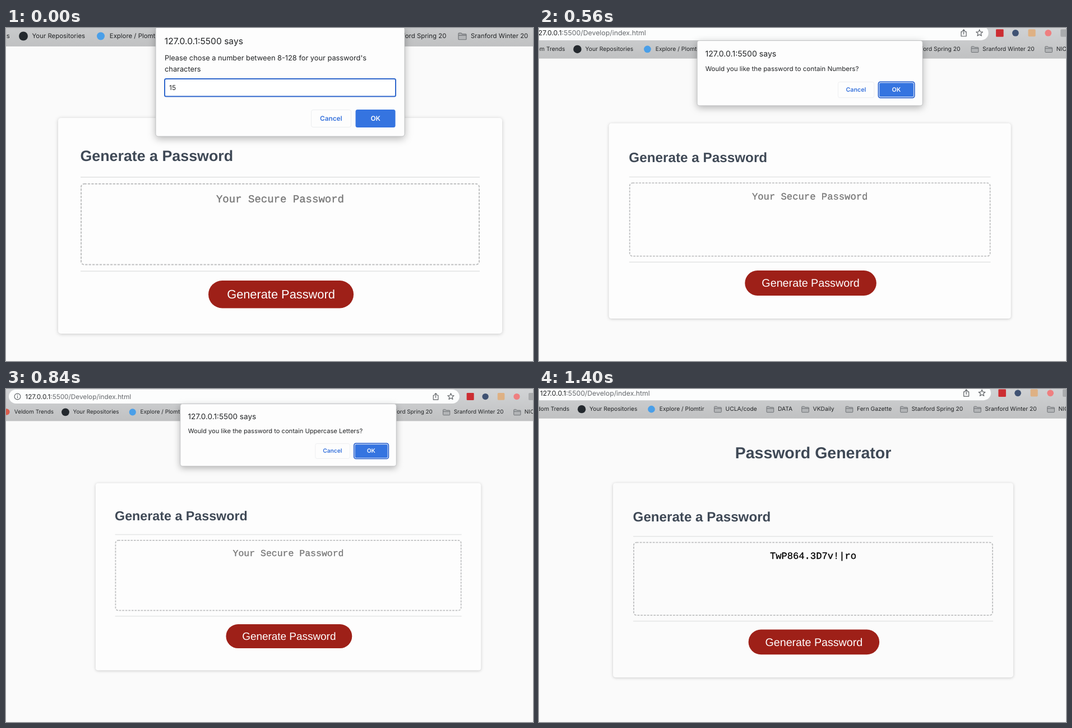
Animation of 940x596 px, one loop 1680 ms. Source, as an HTML page:

```html
<!DOCTYPE html>
<html lang="en">
<head>
<meta charset="utf-8">
<title>Password Generator</title>
<style>
  html, body { margin: 0; width: 100%; height: 100%; overflow: hidden; background: #fafafa; }
  svg { display: block; width: 940px; height: 596px; background: #fafafa; text-rendering: geometricPrecision; }
  .ui { font-family: Inter, Roboto, sans-serif; fill: #222426; }
  .sans { font-family: "Liberation Sans", Arial, sans-serif; }
  .mono { font-family: "Liberation Mono", "Courier New", monospace; stroke: currentColor; stroke-width: .35; }
  .bold { font-weight: 700; fill: #3f4956; }
  .strong { font-weight: 600; }
  .line { fill: none; stroke: #5b5f63; stroke-width: 1.3; stroke-linejoin: round; }
  .folder { fill: #b3b5b7; stroke: #6c6f73; stroke-width: 1.1; }
  .panel { fill: var(--panel); }
  .card { filter: drop-shadow(0 1px 3px rgba(0, 0, 0, .2)); }
  .dialog { filter: drop-shadow(0 4px 7px rgba(0, 0, 0, .28)); stroke: #b4b6b8; stroke-width: .8; }
</style>
</head>
<body>
<svg viewBox="0 0 940 596">
  <defs>
    <linearGradient id="bar" x1="0" y1="0" x2="0" y2="1">
      <stop offset="0" stop-color="#d3d5d7"/>
      <stop offset="1" stop-color="#c0c1c2"/>
    </linearGradient>
  </defs>
  <g id="view"></g>
</svg>
<script>
const text = (x, y, size, str, cls = 'ui', attrs = '') =>
  `<text x="${x}" y="${y}" font-size="${size}" class="${cls}" ${attrs}>${str}</text>`;
const rect = (x, y, w, h, r, attrs) =>
  `<rect x="${x}" y="${y}" width="${w}" height="${h}" rx="${r}" ${attrs}/>`;
const dot = (x, y, r, color) => `<circle cx="${x}" cy="${y}" r="${r}" fill="${color}"/>`;
const path = (x, y, d, cls = '') => `<path class="line ${cls}" transform="translate(${x} ${y})" d="${d}"/>`;
const middle = 'text-anchor="middle"';

// All coordinates are relative to the card's top left corner.
function toolbar() {
  const label = (x, str, attrs) => text(x, -143, 11.4, str, 'ui', attrs);
  const folder = (x, str) =>
    path(x - 15, -146.3, 'M-7 -4.6q0-1 1-1h4l1.6 1.8h6.4q1 0 1 1v7.8q0 1-1 1h-12q-1 0-1-1zM-7 -1.6h14', 'folder') +
    label(x, str);
  const star = [...Array(10)].map((_, i) => {
    const a = i * Math.PI / 5, r = i % 2 ? 3 : 6.8;
    return `${(r * Math.sin(a)).toFixed(2)} ${(-r * Math.cos(a)).toFixed(2)}`;
  }).join('L');
  return rect(-400, -200, 1600, 72, 0, 'fill="url(#bar)"') +
    rect(-178.3, -193, 926, 28.8, 14.4, 'fill="#fcfdfd"') +
    path(-160.5, -178.6, 'M-6.2 0a6.2 6.2 0 1 0 12.4 0a6.2 6.2 0 1 0-12.4 0M0 -.8v4M0 -3.6v1.3') +
    text(-144.5, -173.6, 13.6, '127.0.0.1<tspan fill="#66696d">:5500/Develop/index.html</tspan>') +
    path(699, -178.6, 'M-2 -2.5h-3v9h10v-9h-3M0 3v-9.5M-2.8 -3.8L0 -6.6L2.8 -3.8') +
    path(730, -178.4, `M${star}Z`) +
    rect(762.5, -186, 15, 15, 1.5, 'fill="#cc2d32"') +
    dot(801, -178.5, 6.5, '#3f5273') +
    rect(826, -186, 14.5, 14.5, 2, 'fill="#deb184"') +
    dot(865.4, -178.5, 6.5, '#ee7f80') +
    rect(889.7, -186, 15, 15, 2, 'fill="#a9abad"') +
    dot(-183, -147, 6.5, '#d95c4c') + label(-86.2, 'Veldom Trends', 'text-anchor="end"') +
    dot(-62, -146.5, 8, '#24292e') + label(-46.5, 'Your Repositories') +
    dot(76, -146.5, 7, '#4a9fe8') + label(91.8, 'Explore / Plomtir') +
    folder(222.4, 'UCLA/code') + folder(326, 'DATA') + folder(395.5, 'VKDaily') +
    folder(482.5, 'Fern Gazette') + folder(590.7, 'Stanford Spring 20') +
    folder(736, 'Sranford Winter 20') + folder(881.4, 'NICHE');
}

function page(password) {
  const rule = y => rect(40, y - .9, 712, 1.8, 0, 'fill="#e5e6e6"');
  const ink = password ? '#000' : '#777';
  return text(396, -48.6, 31.6, 'Password Generator', 'sans bold', middle) +
    rect(0, 0, 792, 386, 5, 'class="panel card"') +
    text(39.5, 76.8, 26.8, 'Generate a Password', 'sans bold') +
    rule(106) + rule(274.3) +
    rect(41, 118, 710, 144.5, 5.5, 'fill="none" stroke="#bfc0c1" stroke-width="2" stroke-dasharray="4.2 2.2"') +
    text(396, 150.8, 19, password || 'Your Secure Password', 'mono', `${middle} fill="${ink}" color="${ink}"`) +
    rect(268, 291, 259, 49.5, 24.7, 'fill="#9e2018"') +
    text(397.5, 323.4, 21.8, 'Generate Password', 'sans', `${middle} fill="#fff"`);
}

function dialog(lines, input) {
  const top = input ? -15 : -82.2;
  const button = (x, str, color) =>
    text(x, top + 19.9, 11.8, str, 'ui strong', `${middle} style="fill:${color}"`);
  return rect(174, -163.5, 444, input ? 196.5 : 128.5, 4.5, 'class="panel dialog"') +
    text(189.8, -132, 15.6, '127.0.0.1:5500 says') +
    lines.map((str, i) => text(190, -103 + i * 19.6, 12.8, str)).join('') +
    (input ? rect(190, -70, 412, 31.6, 2.5, 'fill="#fff" stroke="#2f67cc" stroke-width="2"') +
      text(198, -50.2, 12, input) : '') +
    rect(451.5, top + .5, 71, 31, 3.5, 'fill="none" stroke="#ecedef"') +
    (input ? rect(530.5, top, 71, 32, 3.5, 'fill="#3574e0"')
      : rect(531, top + .3, 71, 31.4, 4, 'fill="#fff" stroke="#2a62cf" stroke-width="2"') +
        rect(533, top + 2.3, 67, 27.4, 2, 'fill="#3574e0"')) +
    button(486.8, 'Cancel', '#3571dc') + button(566.2, 'OK', '#fff');
}

const ask = what => dialog([`Would you like the password to contain ${what}?`]);
const scenes = [
  { x: 93, y: 161, zoom: 1, panel: '#fdfdfd', popup: dialog(
    ['Please chose a number between 8-128 for your password\'s', 'characters'], '15') },
  { x: 106.4, y: 171.6, zoom: .954, panel: '#fbfefd', popup: ask('Special Characters') },
  { x: 124.6, y: 170.6, zoom: .9055, panel: '#fdfdfd', popup: ask('Numbers') },
  { x: 159.8, y: 168.5, zoom: .868, panel: '#fdfdfd', popup: ask('Uppercase Letters') },
  { x: 109.2, y: 172.2, zoom: .943, panel: '#fbfefd', popup: ask('Lowercase Letters') },
  { x: 132, y: 168.2, zoom: .9015, panel: '#fbfbfb', popup: '', password: 'TwP864.3D7v!|ro' },
];

const view = document.getElementById('view');
const hold = 280, start = performance.now();
let shown = -1;

function draw() {
  const now = Math.floor((performance.now() - start) / hold) % scenes.length;
  if (now !== shown) {
    const { x, y, zoom, panel, popup, password } = scenes[shown = now];
    view.setAttribute('transform', `translate(${x} ${y}) scale(${zoom})`);
    view.style.setProperty('--panel', panel);
    view.innerHTML = toolbar() + page(password) + popup;
  }
  requestAnimationFrame(draw);
}
draw();
</script>
</body>
</html>
```
